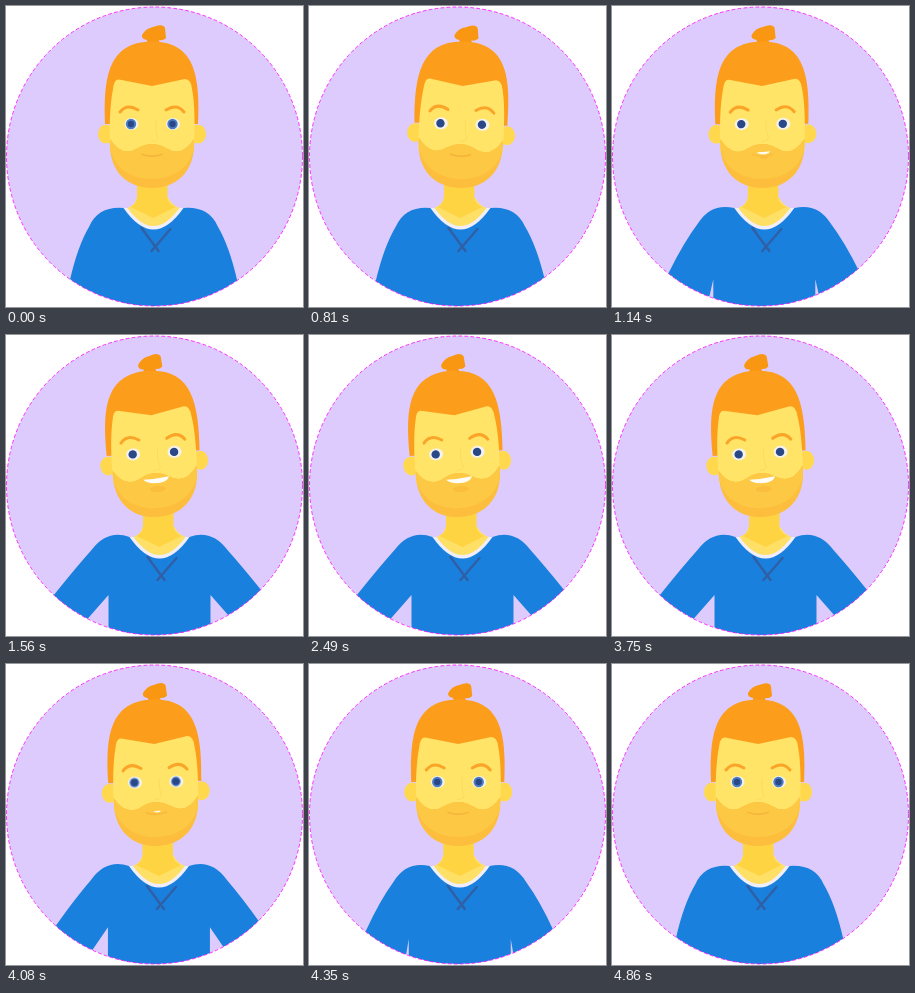
These frames come from a looping animation (297x301 px, 5.31 s). An HTML page:

```html
<!DOCTYPE html>
<html lang="en">
<head>
<meta charset="utf-8">
<title>Avatar</title>
<style>
  html, body { margin: 0; height: 100%; overflow: hidden; background: #fff; }
  svg { display: block; width: 100%; height: 100%; }
  .line { fill: none; stroke-linecap: round; }
</style>
</head>
<body>
<svg viewBox="0 0 297 301">
  <clipPath id="disc"><ellipse cx="148.5" cy="150.5" rx="148" ry="149.5"/></clipPath>
  <g clip-path="url(#disc)">
    <rect width="297" height="301" fill="#dccbfc"/>
    <g id="body">
      <g fill="#1a80dd">
        <path id="half"/>
        <use href="#half" transform="scale(-1 1)"/>
      </g>
      <path d="M-30 202Q0 245 30 202Z" fill="#f1eefc"/>
      <path d="M-17 192Q-18 199 -26 202Q0 238 26 202Q18 199 15 192Z" fill="#ffe066"/>
      <path d="M-16.500 165V192Q-17 198 -23 201L0 212L22 201Q15 198 14 192V165Z" fill="#ffd443"/>
      <path class="line" d="M-12 222L5 245M17 223L-2 245" stroke="#2f60a6" stroke-width="2.500"/>
    </g>
    <g id="head">
      <path d="M136 29Q140 22 147 21Q157 17 159 22L160 32Q157 35 153 34Q153 37 156 40H138Q142 37 141 34Q135 33 136 29Z" fill="#fa9712"/>
      <g fill="#ffd84e">
        <ellipse cx="100" cy="128" rx="8" ry="9.500"/>
        <ellipse cx="192" cy="128" rx="8" ry="9.500"/>
      </g>
      <path d="M99 118C97 70 103 35.500 146 35.500C189 35.500 194 70 192 118Z" fill="#fd9d1c"/>
      <path d="M104 145C103 122 104 98 107 83Q108 73 113 73.500L146 80L179 73Q185 73 186 83C189 98 189 122 188 145Q180 172 146 172Q112 172 104 145Z" fill="#ffe468"/>
      <path d="M104 133Q116 152 132 142Q146 134 160 142Q176 152 188 133C190 166 170 182 146 182C122 182 102 166 104 133Z" fill="#febe3d"/>
      <path d="M104 133Q116 152 132 142Q146 134 160 142Q176 152 188 133C190 158 170 173 146 173C122 173 102 158 104 133Z" fill="#fdc843"/>
      <path class="line" d="M150 114Q149 125 152 132Q150 136 145 135" stroke="#fddb5a"/>
      <path class="line" d="M114 106Q121 97 132 104M160 104Q171 97 178 106" stroke="#fba528" stroke-width="3"/>
      <g id="eyes">
        <g fill="#f4f2ec">
          <ellipse cx="125.500" cy="118" rx="7" ry="6"/>
          <ellipse cx="167" cy="118" rx="7" ry="6"/>
        </g>
        <g id="irises" fill="#2a4788" stroke="#4a7cc4" stroke-width="2">
          <circle cx="125" cy="118" r="4.200"/>
          <circle cx="166.500" cy="118" r="4.200"/>
        </g>
      </g>
      <path id="lips" class="line" d="M136 148.500Q146 152 156 148.500" stroke="#f5b63b" stroke-width="1.800"/>
      <g id="mouth">
        <ellipse cx="1" cy="11" rx="8" ry="3" fill="#fabd3e"/>
        <path d="M-13 1Q0 1 13 -1Q11 4 4 5Q-9 6 -13 1Z" fill="#fffdf8"/>
      </g>
    </g>
  </g>
  <ellipse cx="148.500" cy="150.500" rx="148" ry="149.500" class="line" stroke="#f0f" stroke-width=".8" stroke-dasharray="3 3"/>
</svg>
<script>
const LOOP = 5310;
const set = (id, name, value) => document.getElementById(id).setAttribute(name, value);

const ramp = (t, from, to) => {
  const u = Math.min(1, Math.max(0, (t - from) / (to - from)));
  return u * u * (3 - 2 * u);
};

// Rises from 0 to 1 between a and b, falls back between c and d.
const swell = (t, a, b, c, d) => ramp(t, a, b) - ramp(t, c, d);

// One side of the shirt, measured from the body's middle; lift 1 puts the hand on the hip.
function shirtHalf(lift) {
  const mix = (low, high) => low + (high - low) * lift;
  const gap = 51 + 36 * lift ** 3;
  return `M-2 215L30 202
    Q${mix(55, 52)} ${mix(200, 194)} ${mix(64, 68)} ${mix(220, 215)}
    Q${mix(76, 84)} ${mix(240, 233)} ${mix(84, 104)} ${mix(276, 258)}
    L${mix(90, 138)} 301H${gap}L51 ${mix(290, 260)}V301H-2Z`;
}

function draw(t) {
  const shift = 4 * ramp(t, 450, 840) + 2 * ramp(t, 840, 1530) - 6 * ramp(t, 3900, 4860);
  const tilt = 2 * swell(t, 450, 810, 810, 1530) - 3.5 * swell(t, 810, 1530, 3750, 4380);
  const lift = swell(t, 720, 1500, 3900, 4800);
  const smile = swell(t, 930, 1350, 3800, 4230);
  const alert = swell(t, 450, 780, 3800, 4320);
  const lids = 1 - 0.92 * swell(t, 2490, 2640, 2670, 2820);

  set("half", "d", shirtHalf(lift));
  set("body", "transform", `translate(${147.5 + shift})`);
  set("head", "transform", `translate(${shift}) rotate(${tilt} 146 190)`);
  set("eyes", "transform", `translate(0 ${118 * (1 - lids)}) scale(1 ${lids})`);
  set("irises", "stroke-opacity", 1 - alert);
  set("lips", "opacity", 1 - smile);
  set("mouth", "transform", `translate(147 ${148.5 - 5.5 * smile}) scale(${smile})`);
}

function frame(now) {
  draw(now % LOOP);
  requestAnimationFrame(frame);
}
requestAnimationFrame(frame);
</script>
</body>
</html>
```
